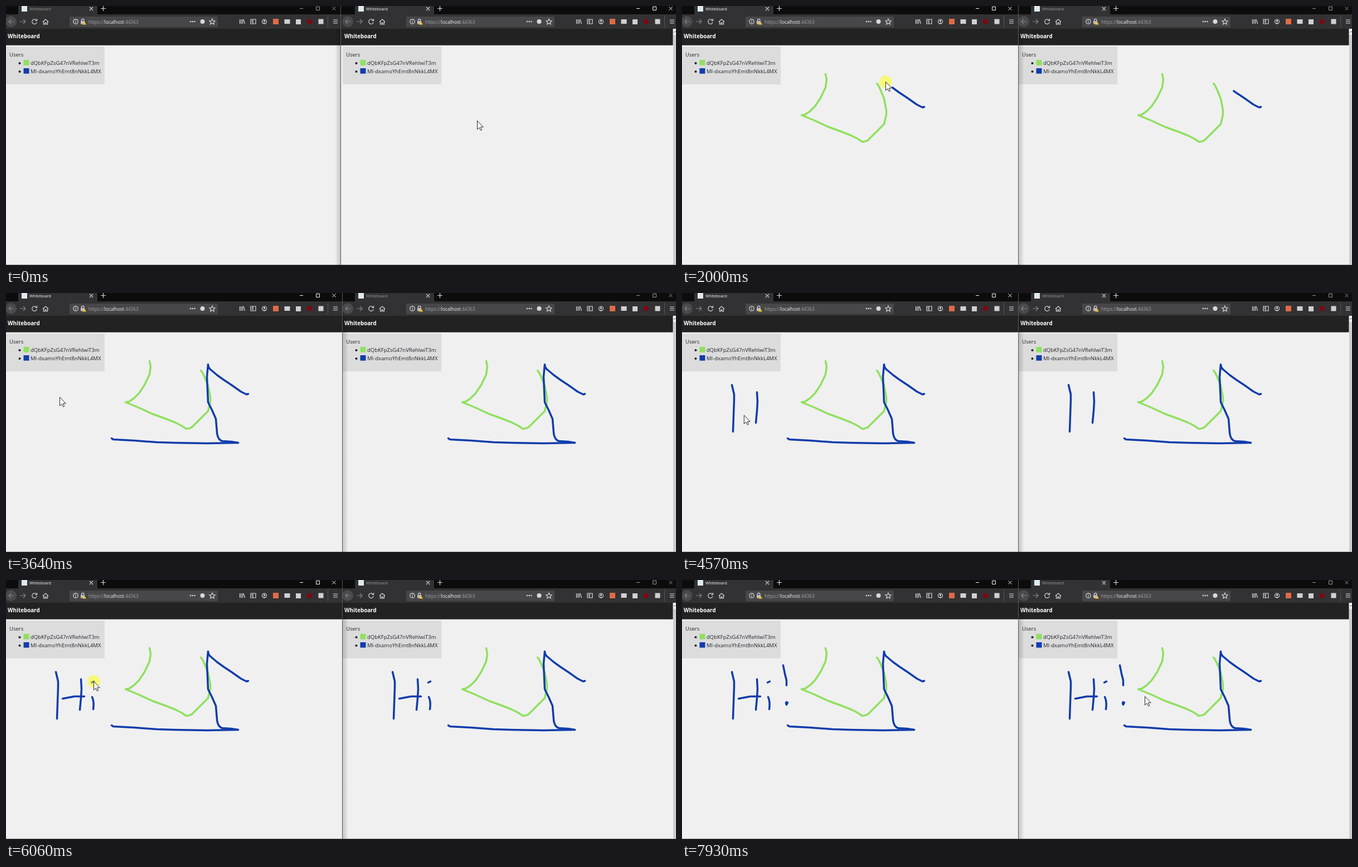
An HTML page for the animation above (8 s loop, 1202 by 466 pixels).

```html
<!DOCTYPE html>
<html lang="en">
<head>
<meta charset="utf-8">
<title>Whiteboard</title>
<style>
  html, body { margin: 0; width: 100%; height: 100%; overflow: hidden; background: #f0f0f0; }
  svg { display: block; }
  text { font-family: "Open Sans", "Noto Sans", sans-serif; white-space: pre; }
  .line { fill: none; stroke: #d8d8da; stroke-width: 1.2; }
  .dim { stroke: #85858a; }
  .ink path { fill: none; stroke-width: 3.5; stroke-linecap: round; stroke-linejoin: round; }
</style>
</head>
<body>
<svg width="1202" height="466" viewBox="0 0 1202 466">
  <defs>
    <linearGradient id="shade">
      <stop offset="0" stop-opacity="0"/>
      <stop offset="1" stop-opacity=".2"/>
    </linearGradient>

    <g id="window">
      <rect x="-3" width="607" height="466" fill="#f0f0f0"/>
      <rect x="-3" width="607" height="15" fill="#0c0c0d"/>
      <path d="M22 0H164V15H604V41H-3V15H22Z" fill="#323234"/>

      <!-- tab strip and window buttons -->
      <rect x="28" width="10" height="10" fill="#dfe9ef"/>
      <text x="42" y="8.200" font-size="7.1" fill="currentColor">Whiteboard</text>
      <path class="line" d="M150 2l6 6m0-6l-6 6M170 4.500h9M174.500 0v9"/>
      <path fill="none" stroke="currentColor" d="M527 4.500h6M556.500 1.500h6v6h-6zM585.500 1.500l6 6m0-6l-6 6"/>

      <!-- navigation -->
      <circle cx="9" cy="28" r="10" fill="#4a4a4c"/>
      <path class="line dim" d="M14 28H5m4-4l-4 4l4 4M25 28h10m-4-4l4 4l-4 4"/>
      <path class="line" d="M54.500 25.500a4.300 4.300 0 1 0 .8 3.500M55.500 23v3.500h-3.500M66 28.500l5-4.500l5 4.500M67.500 28v5h2.500v-3h2v3h2.500v-5"/>

      <!-- address field -->
      <rect x="114" y="19" width="266" height="19" rx="1" fill="#474749"/>
      <circle class="line" cx="125" cy="28" r="4.200"/>
      <path class="line" d="M125 27.500v3M125 25.300v1"/>
      <path class="line" d="M135.500 27v-1.500a2.200 2.200 0 0 1 4.400 0V27"/>
      <rect x="134" y="27" width="7" height="5.500" fill="#bdbdbf"/>
      <path d="M140.500 27.500l3.500 6h-7z" fill="#f2c230"/>
      <text x="148" y="31.500" font-size="8.4" fill="#a2a2a6">https://<tspan fill="#f4f4f5">localhost</tspan>:44363</text>
      <g fill="#d8d8da">
        <circle cx="331" cy="28" r="1.300"/><circle cx="334.700" cy="28" r="1.300"/><circle cx="338.400" cy="28" r="1.300"/>
        <circle cx="352.500" cy="28" r="4"/>
      </g>
      <path class="line" d="M370 23.200l1.500 3.300l3.600.4l-2.700 2.400l.8 3.500l-3.200-1.800l-3.200 1.800l.8-3.500l-2.700-2.400l3.600-.4z"/>

      <!-- toolbar -->
      <path class="line" d="M419.500 24v8M422 24v8M424.500 24v8M426 24l2.500 8M439 24h9v8h-9zM443 24v8M440.500 26.500h1.500M440.500 28.500h1.500M587 25h8M587 28h8M587 31h8"/>
      <circle class="line" cx="463.500" cy="28" r="4"/>
      <path d="M460.500 30.500h6l-3 2z" fill="#d8d8da"/>
      <circle cx="463.500" cy="27" r="1.700" fill="#d8d8da"/>
      <rect x="479" y="23" width="10" height="10" fill="#e06a45"/>
      <g fill="#d0d0d2">
        <rect x="499.500" y="24" width="10" height="8"/>
        <rect x="520" y="24" width="9" height="9"/>
        <rect x="560.500" y="23.500" width="9" height="9"/>
      </g>
      <circle cx="544.500" cy="28" r="4.500" fill="#800610"/>
      <path d="M577.500 17v22" stroke="#555558"/>

      <!-- page -->
      <rect x="-3" y="41" width="607" height="29.700" fill="#222"/>
      <text x="3" y="57.800" font-size="9.8" font-weight="700" fill="#fff">Whiteboard</text>
      <rect y="73" width="177" height="68" fill="#dcdcdc"/>
      <g font-size="9.5" fill="#212529">
        <text x="6" y="91">Users</text>
        <circle cx="24.500" cy="103" r="2.100"/>
        <text x="44" y="106.300">dQbKFpZsG47nVRehlwiT3m</text>
        <circle cx="24.500" cy="118" r="2.100"/>
        <text x="44" y="121.300">MI-dxamoYhEmt8nNkkL4MX</text>
      </g>
      <rect x="31.500" y="97" width="10" height="9.700" fill="#90e060"/>
      <rect x="31.500" y="112" width="10" height="9.700" fill="#103cac"/>
    </g>
  </defs>

  <use id="left" href="#window"/>
  <use id="right" href="#window" x="604"/>
  <rect x="1196.500" y="41" width="6" height="425" fill="#f0f0f0"/>
  <rect x="1197" y="52" width="5" height="414" fill="#cdcdcd"/>
  <path d="M1198 48l2.500-2.500l2.500 2.500" fill="none" stroke="#555"/>
  <rect y="465" width="1202" height="1" fill="#a8a8a8"/>
  <g class="ink" id="leftInk" transform="translate(.5 .5)"></g>
  <g class="ink" id="rightInk" transform="translate(604.5 .5)"></g>
  <g id="edge">
    <rect x="-11" y="41" width="11" height="425" fill="url(#shade)"/>
    <rect x="-1" width="1" height="466" fill="#5a5a5a"/>
  </g>
  <g id="pointer">
    <circle id="press" r="11.300" fill="#ff0" fill-opacity=".5"/>
    <path d="M0 0V15.500L3.600 12.200L6 17.300L8.200 16.300L5.900 11.300H10.800Z" fill="#fff" stroke="#111" stroke-width=".9"/>
  </g>
</svg>

<script>
const LOOP = 8000, RIGHT_X = 604, FOCUS_TIME = 1850;
const OWN_LAG = 30, REMOTE_LAG = 50, RELEASE_LAG = 60;
const GREEN = '#90e060', BLUE = '#103cac';
const $ = id => document.getElementById(id);

// Screen updates come in bursts: first time, last time, number of updates.
const bursts = [
  [150, 920, 11], [1010, 1770, 11], [1850, 2650, 11], [2720, 2950, 4],
  [3100, 3100, 1], [3330, 4110, 11], [4210, 4970, 11], [5040, 5120, 2],
  [5270, 6060, 11], [6140, 6760, 9], [6930, 7720, 11], [7770, 7930, 3]
];

// Pointer journey: start, end, path, and the ink colour when the button is down.
const moves = [
  [75, 210, 'M845 206L861 122'],
  [215, 900, 'M257 122L259 132 257 146 248 165 238 180 229 189 220 195 214 196 236 205 262 217 284 225 302 232 314 238 323 244Q328 244 333 241', GREEN],
  [920, 1380, 'M333 241L362 212 366 195 366 187 362 166 355 149 351 141 349 139', GREEN],
  [1450, 1850, 'M953 139L434 181'],
  [1850, 2010, 'M434 181L431 182 421 177 404 165 389 155 378 147 365 136', BLUE],
  [2010, 2650, 'M365 136Q362 132 362 128L360 150 362 196 369 210 376 226 378 250Q379 264 388 266L404 267 416 269', BLUE],
  [2650, 2900, 'M416 269L360 270 302 269 270 268 230 265 192 263 189 261', BLUE],
  [3250, 3642, 'M189 261L96 187'],
  [3660, 3960, 'M89 165L93 182 93 192 91 249', BLUE],
  [4000, 4225, 'M91 249L134 178'],
  [4230, 4420, 'M134 178L135 195 134 212 132 233', BLUE],
  [4440, 4660, 'M132 233L101 213'],
  [4670, 4920, 'M101 213L122 209 140 209', BLUE],
  [4985, 5110, 'M140 209L153 209'],
  [5250, 5500, 'M154 210Q158 218 156 232', BLUE],
  [5540, 5800, 'M156 232L153 184'],
  [5830, 6010, 'M153 184L155 183 157 182', BLUE],
  [6080, 6260, 'M157 182L181 153'],
  [6270, 6500, 'M181 153L184 168 187 180 187 189', BLUE],
  [6540, 6740, 'M187 189L187 219'],
  [6910, 7050, 'M187 219L186 221 187 224 189 220 187 220', BLUE],
  [7200, 7640, 'M187 220Q500 240 820 225'],
  [7640, 7720, 'M820 225L762 209'],
  [7720, 7930, 'M762 209Q800 192 830 209']
].map(([start, end, d, color]) => {
  const makePath = parent => {
    const path = document.createElementNS('http://www.w3.org/2000/svg', 'path');
    path.setAttribute('d', d);
    if (color) {
      path.setAttribute('stroke', color);
      parent.append(path);
    }
    return path;
  };
  const left = makePath($('leftInk')), right = makePath($('rightInk'));
  return { start, end, color, left, right, length: left.getTotalLength() };
});

const progress = (move, t) =>
  Math.min(1, Math.max(0, (t - move.start) / (move.end - move.start)));

function snap(t) {
  let shown = 0;
  for (const [first, last, count] of bursts) {
    if (t < first) break;
    const step = (last - first) / (count - 1) || 1;
    shown = first + step * Math.min(count - 1, Math.floor((t - first + 22) / step));
  }
  return shown;
}

function reveal(path, move, t) {
  const part = progress(move, t);
  path.style.display = part > 0 ? '' : 'none';
  path.style.strokeDasharray = part < 1 ? `${part * move.length} 9999` : 'none';
}

function draw(t) {
  const rightActive = t < FOCUS_TIME;
  $('left').style.color = rightActive ? '#999' : '#f9f9fa';
  $('right').style.color = rightActive ? '#f9f9fa' : '#999';
  $('edge').setAttribute('transform', rightActive ? 'translate(601)' : 'translate(603) scale(-1 1)');

  let current = moves[0];
  for (const move of moves) {
    if (t >= move.start) current = move;
    if (!move.color) continue;
    const drawnRight = move.color === GREEN;
    reveal(move.left, move, t - (drawnRight ? REMOTE_LAG : OWN_LAG));
    reveal(move.right, move, t - (drawnRight ? OWN_LAG : REMOTE_LAG));
  }

  const { x, y } = current.left.getPointAtLength(progress(current, t) * current.length);
  const offset = current.color === GREEN ? RIGHT_X : 0;
  $('pointer').setAttribute('transform', `translate(${x + offset + .5} ${y + .5})`);
  $('press').style.display = current.color && t < current.end + RELEASE_LAG ? '' : 'none';
}

function tick() {
  draw(snap(performance.now() % LOOP));
  requestAnimationFrame(tick);
}
tick();
</script>
</body>
</html>
```
